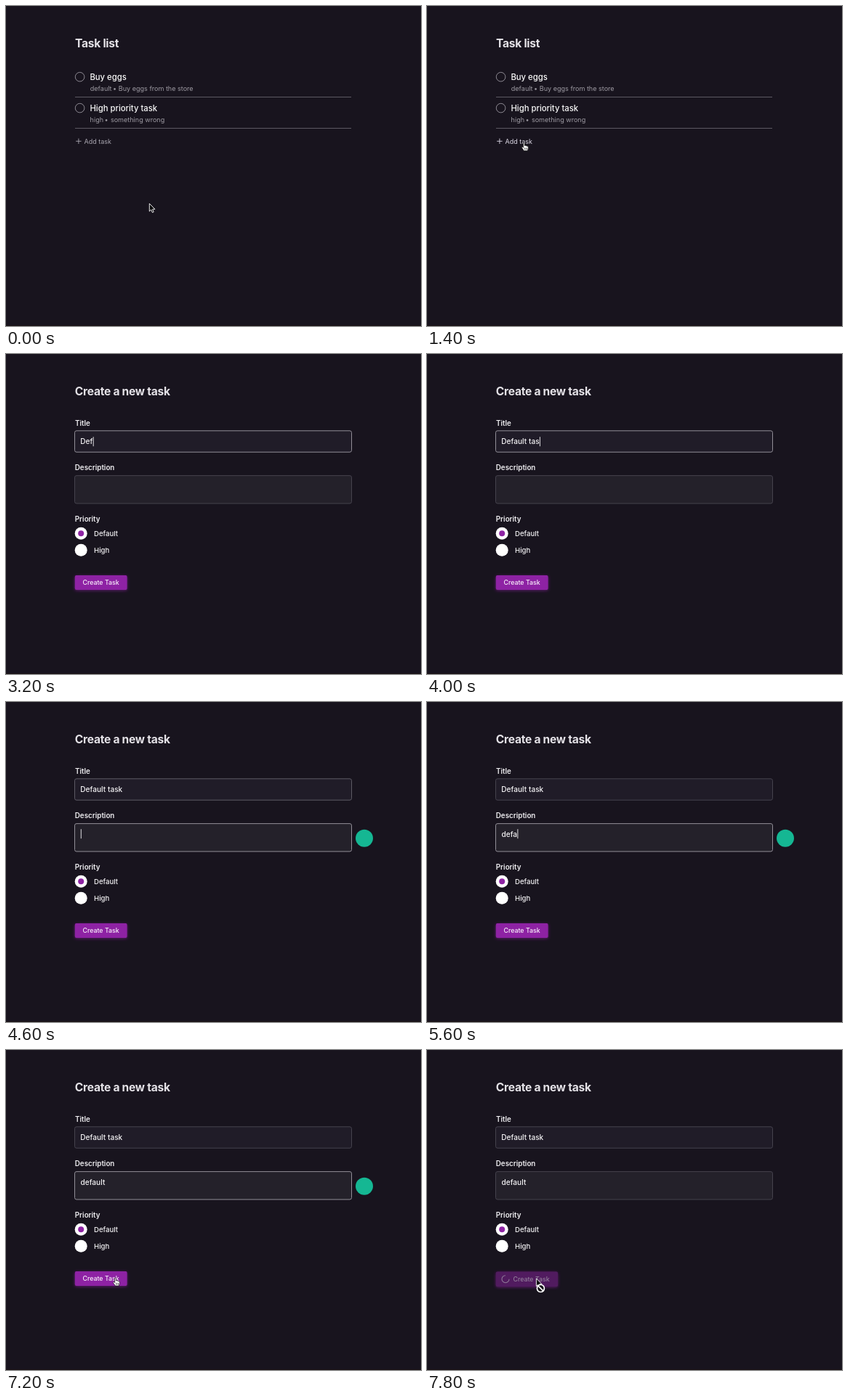
Recreate the animation shown at these times as an HTML page. Size 571 by 441 pixels, loop 8000 ms.

```html
<!DOCTYPE html>
<html lang="en">
<head>
<meta charset="utf-8">
<title>Task list</title>
<style>
  html, body { margin: 0; width: 100%; height: 100%; overflow: hidden; background: #18141e; }
  svg { display: block; width: 100%; height: 100%; }
  text { font-family: Inter, "Open Sans", sans-serif; white-space: pre; }
  .heading { font-size: 15.6px; font-weight: 700; letter-spacing: -.28px; fill: #e4e2e7; }
  .task { font-size: 11.3px; font-weight: 500; fill: #fafafa; }
  .note { font-size: 9.05px; fill: #9d9aa2; }
  .add { font-size: 9px; fill: #a9a6b0; }
  .label { font-size: 9.8px; font-weight: 600; fill: #f1f0f3; }
  .option { font-size: 9.6px; font-weight: 500; fill: #f6f5f7; }
  .value { font-size: 10.15px; font-weight: 500; fill: #f4f3f5; }
  .action { font-size: 8.85px; font-weight: 500; fill: #f8effa; }
  .ring { fill: none; stroke: #99969f; stroke-width: .9; }
  .rule { stroke: #5c5962; }
  .cursor { stroke-linejoin: round; stroke-linecap: round; }
</style>
</head>
<body>
<svg viewBox="0 0 571 441">
  <defs>
    <filter id="glow" x="-10%" y="-40%" width="120%" height="190%">
      <feDropShadow dx="0" dy="1" stdDeviation="2" flood-color="#8e24a4" flood-opacity=".6"/>
    </filter>
    <path id="pointer" d="M0 0V10.4L2.4 8.2 4.1 12 5.9 11.2 4.3 7.5H7.3Z" fill="#0b0b0d" stroke="#fff" stroke-width=".9"/>
    <path id="beamShape" d="M-2.8-5.8Q0-5.8 0-4.2Q0-5.8 2.8-5.8M0-4.2V4.2M-2.8 5.8Q0 5.8 0 4.2Q0 5.8 2.8 5.8M-1.4 1.6H1.4"/>
  </defs>
  <rect width="571" height="441" fill="#18141e"/>
  <rect y="440" width="571" height="1" fill="#1b1214"/>

  <g id="list">
    <text class="heading" x="95" y="57.3">Task list</text>
    <circle class="ring" cx="101.6" cy="97.7" r="6.3"/>
    <text class="task" x="115.4" y="102">Buy eggs</text>
    <text class="note" y="117"><tspan x="115.8">default</tspan><tspan x="147">•</tspan><tspan x="154.8">Buy eggs from the store</tspan></text>
    <path class="rule" d="M95 125.5H475M95 168.5H475"/>
    <circle class="ring" cx="101.6" cy="140.6" r="6.3"/>
    <text class="task" x="115.4" y="145">High priority task</text>
    <text class="note" y="160"><tspan x="115.6">high</tspan><tspan x="135.6">•</tspan><tspan x="143.9">something wrong</tspan></text>
    <g id="add">
      <path d="M96.2 186.3H103.6M99.9 182.6V190" stroke="#a9a6b0" stroke-width=".9"/>
      <text class="add" x="107.5" y="189.6">Add task</text>
    </g>
  </g>

  <g id="form">
    <text class="heading" x="94.8" y="57.3">Create a new task</text>
    <text class="label" x="95" y="98.6">Title</text>
    <rect id="titleBox" x="94.5" y="105.8" width="381" height="29.4" rx="2.5" fill="#201c28"/>
    <text class="value" id="title" x="102.3" y="124.4"></text>
    <text class="label" x="94.8" y="160.4">Description</text>
    <rect id="descBox" x="94.5" y="167.6" width="381" height="38.4" rx="2.5" fill="#24212a"/>
    <text class="value" id="desc" x="102.5" y="185.5"></text>
    <rect id="caret" width=".9" height="13" fill="#f4f3f5"/>
    <circle id="badge" cx="493" cy="187.7" r="12" fill="#15b793"/>
    <text class="label" x="94.8" y="231">Priority</text>
    <circle cx="103.2" cy="247.2" r="8.5" fill="#fff"/>
    <circle cx="103.2" cy="247.2" r="4" fill="#8e24a4"/>
    <text class="option" x="121" y="250.9">Default</text>
    <circle cx="103.2" cy="270.3" r="8.5" fill="#fff"/>
    <text class="option" x="121" y="274">High</text>
    <g id="ready">
      <rect x="94.8" y="305" width="71.8" height="20" rx="2" fill="#8e24a4" filter="url(#glow)"/>
      <text class="action" x="105.4" y="318.2">Create Task</text>
    </g>
    <g id="loading">
      <rect x="94.8" y="305.5" width="85.2" height="20.5" rx="2" fill="#531f62" filter="url(#glow)" opacity=".97"/>
      <path id="spinner" d="M108 310.7A5 5 0 1 0 113 315.7" fill="none" stroke="#8d7897" stroke-width="1.1"/>
      <text class="action" x="118.4" y="318.9" style="fill:#8f7b98">Create Task</text>
    </g>
  </g>

  <g class="cursor" id="arrow"><use href="#pointer"/></g>
  <g class="cursor" id="hand">
    <path d="M-1 .8C-1-.3 .8-.3 .8 .8V4C1.3 3.2 2.5 3.4 2.6 4.3 3.2 3.7 4.2 4 4.3 4.8 5.1 4.4 5.8 4.9 5.8 5.7V7.6C5.8 9 5 9.6 4.9 11H-.3C-.6 9.5-2.4 8.1-3 6.7-3.4 5.7-2.2 5.2-1.5 6L-1 6.5Z" fill="#fff" stroke="#111" stroke-width=".7"/>
    <path d="M1 7.2V9.3M2.5 7.2V9.3M4 7.2V9.3" stroke="#222" stroke-width=".6"/>
  </g>
  <g class="cursor" id="beam" fill="none">
    <use href="#beamShape" stroke="#c9c8cc" stroke-width="1.8"/>
    <use href="#beamShape" stroke="#1c1920" stroke-width=".8"/>
  </g>
  <g class="cursor" id="blocked">
    <use href="#pointer"/>
    <circle cx="6" cy="13.3" r="5" fill="#151217" stroke="#fff" stroke-width="1.7"/>
    <path d="M2.6 9.9 9.4 16.7" stroke="#fff" stroke-width="1.6"/>
  </g>
</svg>
<script>
  const LOOP = 8000, TICK = 200;
  const $ = id => document.getElementById(id);
  const show = (id, on) => { $(id).style.display = on ? '' : 'none'; };
  const cursors = ['arrow', 'hand', 'beam', 'blocked'];
  const border = { idle: '#45424d', fading: '#5d5a64', hover: '#6b6871', focus: '#918e97' };

  // Each track lists [start time, state...]; the latest started entry holds.
  const pointerTrack = [
    [0, 'arrow', 197.3, 272.6], [800, 'arrow', 194, 267], [1000, 'arrow', 167, 233],
    [1200, 'arrow', 142, 200], [1400, 'hand', 133.5, 188.6], [1800, 'beam', 136, 187],
    [2000, 'beam', 142, 150], [2200, 'beam', 148.2, 117], [2800, 'none', 0, 0],
    [6400, 'beam', 126.8, 200], [6600, 'arrow', 129, 211], [6800, 'arrow', 135, 246],
    [7000, 'arrow', 145, 290], [7200, 'hand', 150.5, 314], [7600, 'blocked', 150.4, 315.2]
  ];
  const titleTrack = [[0, 0], [2800, 1], [3000, 2], [3200, 3], [3400, 5], [3600, 7], [3800, 9], [4000, 11], [4200, 12]];
  const titleBorder = [[0, 'idle'], [2200, 'hover'], [2400, 'focus'], [4600, 'fading'], [4800, 'idle']];
  const descBorder = [[0, 'idle'], [1800, 'hover'], [2000, 'idle'], [4600, 'focus'], [7400, 'idle']];
  const caretTrack = [[0, ''], [2400, 'title'], [4600, 'desc'], [6400, ''], [6800, 'desc'], [7200, '']];

  const at = (track, t) => track.filter(([start]) => start <= t).pop().slice(1);

  function draw(t) {
    const inForm = t >= 1800;
    show('list', !inForm);
    show('form', inForm);
    $('add').style.filter = t >= 1400 ? 'brightness(1.3)' : '';

    $('title').textContent = 'Default task'.slice(0, at(titleTrack, t)[0]);
    $('desc').textContent = 'default'.slice(0, Math.max(0, (t - 4800) / TICK));
    $('titleBox').style.stroke = border[at(titleBorder, t)[0]];
    $('descBox').style.stroke = border[at(descBorder, t)[0]];
    show('badge', t >= 4600 && t < 7400);

    const [field] = at(caretTrack, t);
    show('caret', field);
    if (field) {
      const text = $(field);
      const width = text.textContent ? text.getComputedTextLength() : 0;
      $('caret').setAttribute('x', +text.getAttribute('x') + width + .3);
      $('caret').setAttribute('y', field === 'title' ? 114.2 : 175.2);
    }

    const busy = t >= 7600;
    show('ready', !busy);
    show('loading', busy);
    $('spinner').setAttribute('transform', `rotate(${(t - 7800) * .45} 108 315.7)`);

    const [shape, x, y] = at(pointerTrack, t);
    cursors.forEach(id => show(id, id === shape));
    if (shape !== 'none') $(shape).setAttribute('transform', `translate(${x} ${y})`);
  }

  const begin = performance.now();
  let last = -1;
  function frame() {
    const t = Math.floor((performance.now() - begin) % LOOP / TICK) * TICK;
    if (t !== last) draw(last = t);
    requestAnimationFrame(frame);
  }
  frame();
</script>
</body>
</html>
```
